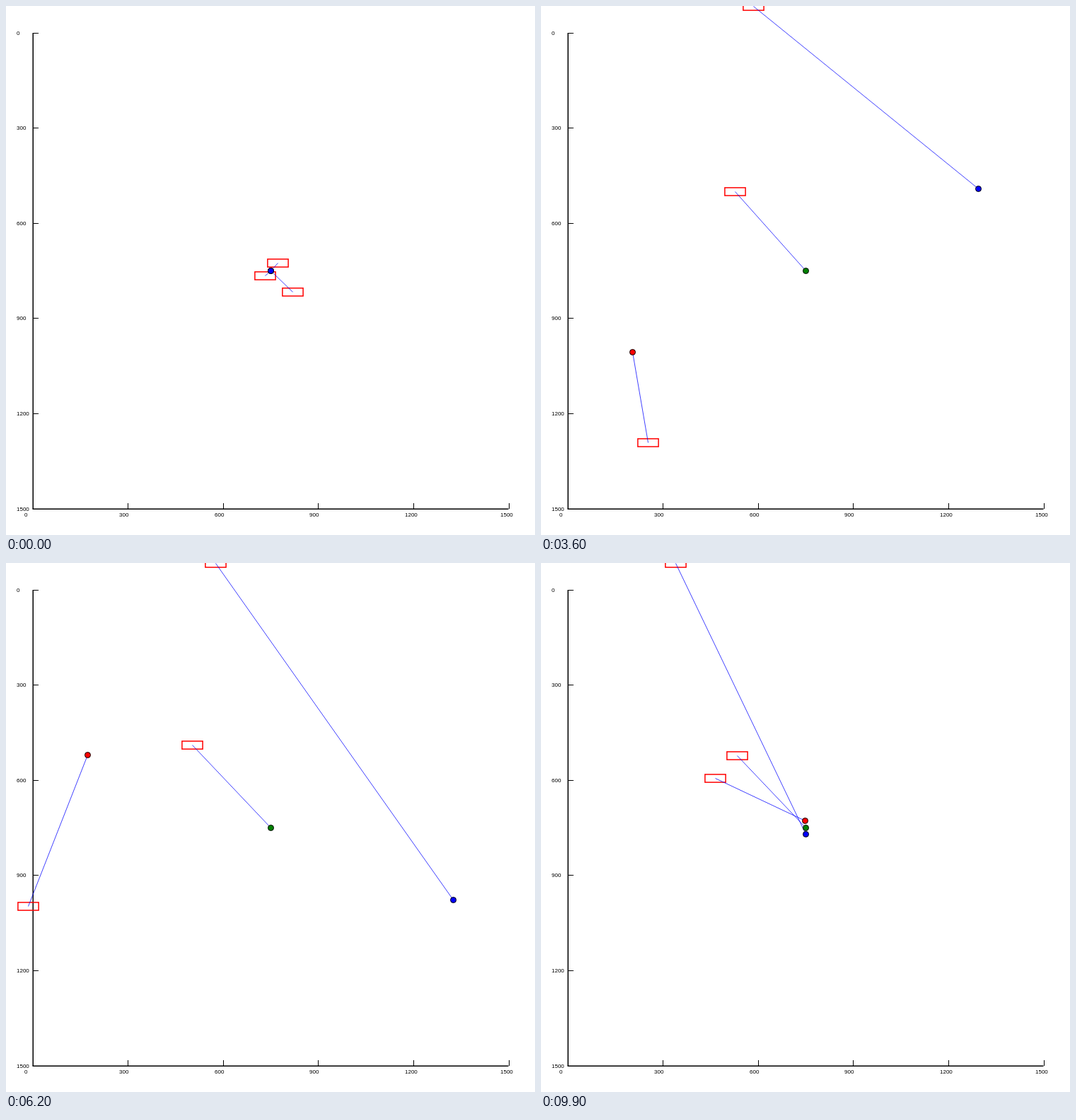
Recreate the animation shown at these times as an HTML page with a canvas. Size 748 px wide and 748 px high, loop 10000 ms.

```html
<!DOCTYPE html>
<html lang="en">
<head>
<meta charset="utf-8">
<title>Moving labels</title>
<style>
  html, body { margin: 0; width: 100%; height: 100%; overflow: hidden; background: #fff; }
  canvas { display: block; width: 748px; height: 748px; }
</style>
</head>
<body>
<canvas id="stage" width="748" height="748"></canvas>
<script>
const ctx = document.getElementById('stage').getContext('2d');
const SIZE = 748, LOOP = 10000, STEP = 100;
const MID = 374, RADIUS = 149.5;
const AXIS = 38, TICK_GAP = 134.6;
const BOX_W = 29.2, BOX_H = 11.2;

// Each dot circles once per loop (dir 0 rests); its box drifts through a few [seconds, x, y].
const items = [
  { color: '#f00', dir: -1, keys: [
    [0, 405, 404], [1.7, 300, 481], [2.2, 261, 538], [3.6, 151, 617],
    [6.2, 31, 485], [7.6, 68, 372], [9.9, 246, 304]] },
  { color: '#008000', dir: 0, keys: [
    [0, 366, 381], [1.7, 313, 316], [3.6, 274, 262], [5.7, 264, 257], [9.9, 277, 272]] },
  { color: '#00f', dir: 1, keys: [
    [0, 384, 363], [1.1, 361, 274], [1.7, 338, 147],
    [3.6, 300, -240], [7.6, 280, -240], [9.9, 190, -240]] }
];

// Slope at key i along column k, weighted for uneven spacing.
function slope(keys, i, k) {
  const rate = j => (keys[j + 1][k] - keys[j][k]) / (keys[j + 1][0] - keys[j][0]);
  if (i === 0) return rate(0);
  if (i === keys.length - 1) return rate(i - 1);
  const before = keys[i][0] - keys[i - 1][0];
  const after = keys[i + 1][0] - keys[i][0];
  return (rate(i - 1) * after + rate(i) * before) / (before + after);
}

// Smooth curve through the keys.
function along(keys, t, k) {
  let i = 0;
  while (i < keys.length - 2 && t >= keys[i + 1][0]) i++;
  const a = keys[i], b = keys[i + 1], span = b[0] - a[0];
  const u = (t - a[0]) / span, v = 1 - u;
  return a[k] * (1 + 2 * u) * v * v + b[k] * (3 - 2 * u) * u * u +
    span * u * v * (slope(keys, i, k) * v - slope(keys, i + 1, k) * u);
}

// Centre of the pixel that holds the coordinate.
const snap = n => Math.floor(n) + 0.5;

function pose({ color, dir, keys }, t) {
  const angle = t / 10 * 2 * Math.PI;
  return {
    color,
    x: snap(MID + dir * RADIUS * (1 - Math.cos(angle))),
    y: snap(MID - dir * RADIUS * Math.sin(angle)),
    boxX: snap(along(keys, t, 1)),
    boxY: snap(Math.max(0, along(keys, t, 2)))
  };
}

function drawAxes() {
  const length = TICK_GAP * 5;
  ctx.fillStyle = '#000';
  ctx.fillRect(AXIS - 0.5, AXIS, 1.5, length);
  ctx.fillRect(AXIS - 0.5, AXIS + length - 0.5, length, 1.5);
  ctx.font = '8px "Liberation Sans", Arial, sans-serif';
  for (let i = 0; i <= 5; i++) {
    const pos = Math.floor(AXIS + i * TICK_GAP);
    if (i < 5) ctx.fillRect(AXIS, pos, 8, 1);
    if (i > 0) ctx.fillRect(pos, 703, 1, 8);
    ctx.fillText(i * 300, 15, pos + 3);
    ctx.fillText(i * 300, pos - 12, 722);
  }
}

function drawBox({ boxX, boxY }) {
  ctx.strokeStyle = '#f00';
  ctx.lineWidth = 1.5;
  ctx.strokeRect(boxX - BOX_W / 2, boxY - BOX_H / 2, BOX_W, BOX_H);
}

function drawLink({ x, y, boxX, boxY }) {
  ctx.strokeStyle = '#00f';
  ctx.lineWidth = 0.75;
  ctx.beginPath();
  ctx.moveTo(x, y);
  ctx.lineTo(boxX, boxY);
  ctx.stroke();
}

function drawDot({ x, y, color }) {
  ctx.fillStyle = color;
  ctx.strokeStyle = '#000';
  ctx.lineWidth = 1;
  ctx.beginPath();
  ctx.arc(x, y, 4, 0, 2 * Math.PI);
  ctx.fill();
  ctx.stroke();
}

function draw(t) {
  ctx.fillStyle = '#fff';
  ctx.fillRect(0, 0, SIZE, SIZE);
  drawAxes();
  const poses = items.map(item => pose(item, t));
  poses.forEach(drawBox);
  poses.forEach(drawLink);
  poses.forEach(drawDot);
}

const start = performance.now();
function tick() {
  const ms = (performance.now() - start) % LOOP;
  draw(Math.floor(ms / STEP) * STEP / 1000);
  requestAnimationFrame(tick);
}
tick();
</script>
</body>
</html>
```
